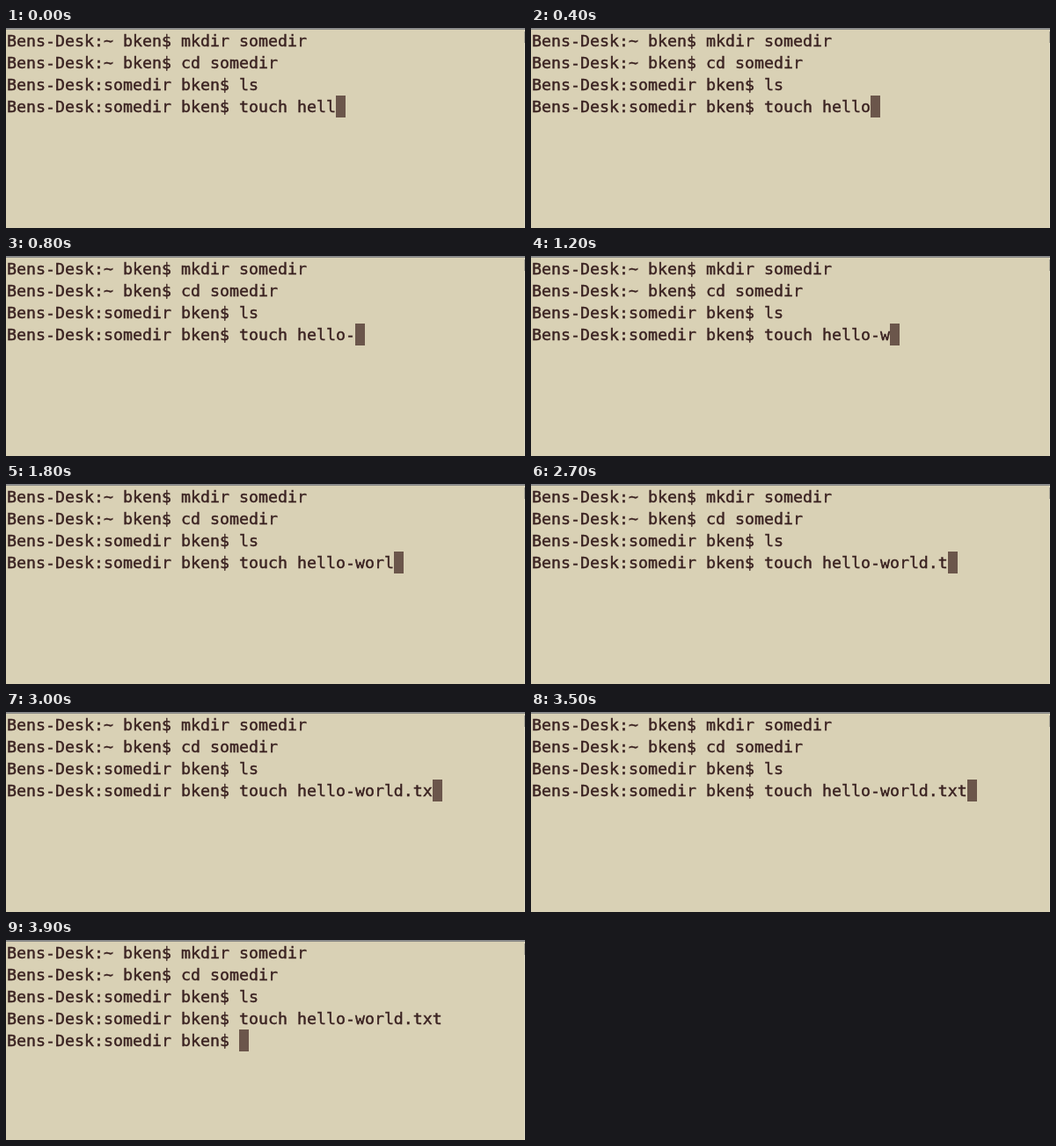
Animation, 590 px wide and 228 px high, one loop 4000 ms. Source, as an HTML page:

```html
<!DOCTYPE html>
<html lang="en">
<head>
<meta charset="utf-8">
<title>Terminal</title>
<style>
html, body { margin: 0; width: 100%; height: 100%; overflow: hidden; background: #d9d1b5; }
svg { display: block; }
text {
  font: 18.27px "DejaVu Sans Mono", monospace;
  fill: #3b2322;
  stroke: #3b2322;
  stroke-width: .45px;
  white-space: pre;
  font-variant-ligatures: none;
}
</style>
</head>
<body>
<svg id="stage" width="590" height="228" viewBox="0 0 590 228">
  <rect width="590" height="228" fill="#d9d1b5"/>
  <rect width="590" height="1" fill="#8e8f90"/>
  <rect y="1" width="590" height="1" fill="#8a8986"/>
  <rect x="589" y="2" width="1" height="226" fill="#e0dac4"/>
  <rect x="589" y="4" width="1" height="13" fill="#a9a598"/>
  <rect id="cursor" width="11" height="25" fill="#6b564b"/>
</svg>
<script>
const LOOP = 4000, LEFT = 1, CELL = 11, ROW = 25, BASE = 21;
const HOST = 'Bens-Desk', USER = 'bken';
const prompt = dir => `${HOST}:${dir} ${USER}$ `;
const history = [
  prompt('~') + 'mkdir somedir',
  prompt('~') + 'cd somedir',
  prompt('somedir') + 'ls'
];
const start = 'touch hell', rest = 'o-world.txt';
// one time per remaining key, the last is Return
const keys = [400, 700, 1100, 1300, 1500, 1700, 2000, 2300, 2600, 2900, 3200, 3600];

const stage = document.getElementById('stage');
const cursor = document.getElementById('cursor');
const rows = Array.from({ length: 5 }, (_, i) => {
  const row = document.createElementNS('http://www.w3.org/2000/svg', 'text');
  row.setAttribute('x', LEFT);
  row.setAttribute('y', BASE + i * ROW);
  row.textContent = history[i] || '';
  return stage.appendChild(row);
});

function draw(ms) {
  const pressed = keys.filter(t => t <= ms).length;
  const entered = pressed === keys.length;
  const command = prompt('somedir') + start + rest.slice(0, pressed);
  const next = entered ? prompt('somedir') : '';
  rows[3].textContent = command;
  rows[4].textContent = next;
  cursor.setAttribute('x', LEFT + CELL * (entered ? next : command).length);
  cursor.setAttribute('y', 2 + ROW * (entered ? 4 : 3));
}

const began = performance.now();
function tick() {
  draw((performance.now() - began) % LOOP);
  requestAnimationFrame(tick);
}
draw(0);
requestAnimationFrame(tick);
</script>
</body>
</html>
```
